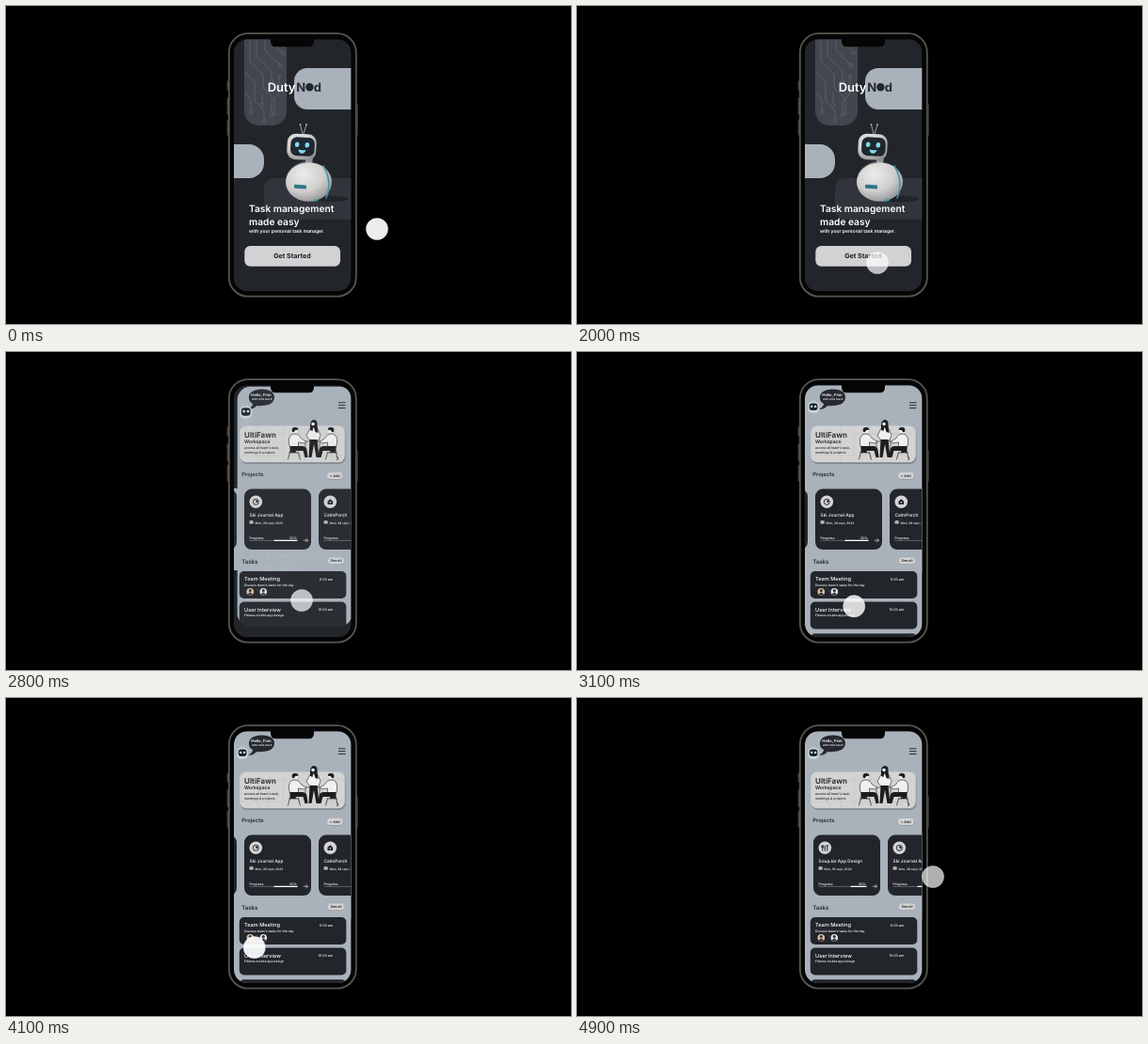
An HTML page that plays this animation: 600 by 338 pixels, repeating every 5 s.

```html
<!DOCTYPE html>
<html lang="en">
<head>
<meta charset="utf-8">
<title>Task manager app</title>
<style>
html, body { margin: 0; width: 100%; height: 100%; overflow: hidden; background: #000; }
svg { display: block; width: 100vw; height: 100vh; }
text { font-family: Inter, "Open Sans", sans-serif; font-weight: 500; text-rendering: geometricPrecision; }
</style>
</head>
<body>
<svg id="stage" viewBox="0 0 600 338" preserveAspectRatio="none"></svg>
<script>
const DARK = '#22262b', LIGHT = '#a9b2bb', PALE = '#d4d4d5';
const label = (s, x, y, size, fill = '#fff', weight = 500, anchor = 'start') =>
  `<text x="${x}" y="${y}" font-size="${size}" fill="${fill}" style="font-weight:${weight}" text-anchor="${anchor}">${s}</text>`;
const rect = (x, y, w, h, r, fill, more = '') =>
  `<rect x="${x}" y="${y}" width="${w}" height="${h}" rx="${r}" fill="${fill}" ${more}/>`;
const dot = (x, y, r, fill, more = '') => `<circle cx="${x}" cy="${y}" r="${r}" fill="${fill}" ${more}/>`;
const line = (d, stroke, w = 1, more = '') =>
  `<path d="${d}" fill="none" stroke="${stroke}" stroke-width="${w}" stroke-linecap="round" ${more}/>`;

const phone = rect(236.8, 29.2, 135, 279.4, 20, '#050506', 'stroke="#55564f" stroke-width="1.8"')
  + line('M235.3 80v9M235.3 98v17M235.3 121v16M373 105v32', '#484945', 1.3);

const circuit = rect(253, 20, 45, 107, 15, '#42474f')
  + `<g clip-path="url(#panel)">`
  + line('M259 35v24l14 14v14l12 12v13M266 35v18l16 16v9M253 70l11 11v20l10 10v10M275 35v12l15 15M253 92l7 7v12M284 35v5l9 9M290 77v16l-8 8v13M272 93v10', '#626871', .7)
  + [[282, 80], [285, 114], [274, 122], [291, 63], [260, 113], [294, 50], [290, 75], [272, 105], [282, 116]]
    .map(([x, y]) => dot(x, y, 1.7, '#42474f', 'stroke="#626871" stroke-width=".7"')).join('')
  + '</g>';

const robot = `<ellipse cx="343" cy="205" rx="20" ry="3.2" fill="#15181b" opacity=".6"/>
  ${line('M315 136L312.500 126M316 136L319 126', '#b9b9b9', .8)}${dot(312.5, 126, .8, '#ddd')}${dot(319, 126, .8, '#ddd')}
  <path d="M318 160h8l-1 9h-7z" fill="#8d9093"/>
  <ellipse cx="321.5" cy="187" rx="24.5" ry="20.8" fill="url(#shell)"/>
  ${line('M337 170q10 17 3 34', '#4795a3', 1.6)}${line('M299 178q8-12 22-13', '#aaa9aa', .6)}
  ${rect(306, 190, 13, 4, 1, '#2f7685', 'transform="rotate(4 312 192)"')}
  ${line('M327 207l4-1', '#4795a3', 2.2)}
  <g transform="rotate(3 314 150)">${rect(298.5, 136, 31, 27.5, 9, 'url(#shell)')}${rect(302.2, 139.5, 25.5, 20, 6.5, '#20272e')}
  <ellipse cx="309" cy="147.5" rx="2.3" ry="2.8" fill="#7edbee"/><ellipse cx="319.7" cy="147.5" rx="2.3" ry="2.8" fill="#7edbee"/>
  <path d="M310.5 152.7q4 1.2 8 0q-.8 4-4 4t-4-4z" fill="#7edbee"/></g>`;

const welcome = label('Duty', 307.5, 90.5, 13, '#fff', 600, 'end') + label('N', 308.3, 90.5, 13, '#24272d', 700)
  + dot(322.4, 86.3, 4.2, '#24272d') + label('d', 326.7, 90.5, 13, '#24272d', 700)
  + label('Task management', 258, 218.6, 10.2, '#fff', 600) + label('made easy', 258, 232.6, 10.2, '#fff', 600)
  + label('with your personal task manager.', 258, 241.3, 5, '#fff', 600)
  + rect(253.3, 255, 101.7, 21.8, 6, '#d3d1d4') + label('Get Started', 304, 268.4, 7.1, '#1c1e22', 700, 'middle');

// Two seated colleagues and one standing between them
const seated = `<path d="M-7 15q-1-9 5-10q6 0 8 5l5 3l-1 2l-7-1v5h-9z" fill="#f0f0f0" stroke="#222" stroke-width=".6"/>
  <path d="M-6 18h13q4 0 5 4l1 8h-3l-2-7h-8l1 2h-7z" fill="#1d1d1f"/>${line('M-6 25l-2 7M3 25l2 7M-7 25h10', '#333', .8)}
  ${dot(-.5, 1.5, 2.5, '#eee')}<path d="M-3.500 3q-1.500-5 3-5q4 0 3 3q-3-1-4 2z" fill="#1d1d1f"/>`;
const people = line('M314 95h23M318 95v17M333 95v17', '#444', .7)
  + `<g transform="translate(307.500 82)">${seated}</g><g transform="translate(344.500 82) scale(-1 1)">${seated}</g>`
  + `<path d="M323 81l7-1l4 8l-2 6h-9l-4-5z" fill="#f0f0f0" stroke="#222" stroke-width=".6"/>
  <path d="M322.500 93h8l2 19h-3l-2.500-14l-2.500 14h-3z" fill="#1d1d1f"/>
  <path d="M323 83q-1-11 4-11q4 0 3.500 6l1 8l-3-1l-2-6l-1 5z" fill="#1d1d1f"/>` + dot(326, 76.5, 1.8, '#eee');

const icons = {
  food: line('M-2.5-2v5M0-2v5M2.5-2v5M-3.3-2.5v2h1.6v-2M1.7-2.5h1.5', '#22262b', 1),
  art: dot(0, 0, 3, 'none', 'stroke="#22262b" stroke-width="1"') + dot(1, -.5, 1.2, '#22262b'),
  home: '<path d="M0-3l2.8 2.4v3.200h-5.600v-3.200z" fill="#22262b"/>' + dot(0, .6, .8, PALE)
};
const project = (i, icon, name, date, pct) => `<g transform="translate(${i * 79} 0)">${rect(0, 145.6, 71, 64.4, 8, DARK)}
  ${dot(12.3, 159.3, 6.8, PALE)}<g transform="translate(12.3 159.3)">${icon}</g>
  ${label(name, 5.6, 175.2, 4.75)}${rect(5.6, 179.2, 4, 3.2, .4, PALE)}${line('M5.8 179.5l1.8 1.5l1.8-1.5', DARK, .4)}
  ${label(date, 11.5, 182.8, 3.2)}${label('Progress', 5.6, 198.7, 3.5)}${label(pct + '%', 56, 198.7, 3.5, '#fff', 500, 'end')}
  ${line('M6 200.4h50', '#777c82', .7)}${line(`M${pct > 60 ? 40 : 32} 200.4H56`, '#fff', 1.1)}
  ${line('M63.2 200.2h4.3m-1.8-1.8l1.8 1.8l-1.8 1.8', '#ddd', .7)}</g>`;
const projects = project(0, icons.food, 'SoupJar App Design', 'Mon, 19 sept, 2022', 85)
  + project(1, icons.art, 'Ski Journal App', 'Mon, 28 sept, 2022', 50)
  + project(2, icons.home, 'CalmPorch', 'Wed, 28 sept, 2022', 70);

const task = (y, name, note, time) => rect(247.8, y, 113.5, 29, 5, DARK) + label(name, 253, y + 10.2, 5.6)
  + label(note, 253, y + 15.6, 3.4) + label(time, 347, y + 9.9, 3.6, '#fff', 500, 'end');
const face = (x, back, hair) => dot(x, 254.7, 3.8, back) + dot(x, 253.6, 1.6, hair)
  + `<path d="M${x - 2.5} 257.4q2.5-4 5 0q-2.5 1.8-5 0z" fill="${hair}"/>`;
const pill = (x, y, w, s) => rect(x, y + .6, w, 7, 3.3, '#7f868d') + rect(x, y, w, 7, 3.3, PALE)
  + label(s, x + w / 2, y + 4.9, 3.8, '#222', 600, 'middle');

const home = `<path d="M257 61q5-3 5-6q-5-3-4-8q1-7 13-7.5q13 0 14 8q0 9-13 9.5q-4 .5-6 0q-3 4-9 4z" fill="#26292f"/>`
  + label('Hello, Finn', 260.3, 47.4, 4.2, '#fff', 600) + label('welcome back', 261, 51.2, 3.1)
  + line('M353.3 53.8h6.8M353.3 56.7h6.8M353.3 59.6h6.8', '#25282d', 1)
  + rect(249, 80, 111.5, 39, 7, '#7f878f') + rect(248.3, 78.5, 111.5, 38.7, 7, '#d3d3d3')
  + line('M280 79v38M294 79v38M268 79v38M311 79v38M345 79v38M250 87h109M250 110h109', '#bdbdbe', .4) + people
  + label('UltiFawn', 253, 91.2, 8, '#222', 600) + label('Workspace', 253, 97.2, 5, '#222', 600)
  + label("access all team's task,", 253, 102.7, 3.45, '#222') + label('meetings &amp; projects', 253, 107.7, 3.45, '#222')
  + line('M351.3 111.5l1.6 1.7l-1.6 1.7', '#222', .8)
  + label('Projects', 250.2, 132.3, 5.9, '#24272c', 600) + pill(341, 128, 16.5, '+ Add')
  + `<g id="cards">${projects}</g>`
  + label('Tasks', 250.2, 225, 6.1, '#24272c', 600) + pill(342, 218.5, 17, 'See all')
  + task(233, 'Team Meeting', "Discuss team's tasks for the day", '9:00 am')
  + face(259.3, '#d9c5ad', '#4a3428') + face(273.3, '#e4e4e4', '#3a3a3d') + line('M266 252l1.5 1.5', '#777', .5)
  + task(265.5, 'User Interview', 'Fitness mobile app design', '10:00 am') + rect(247.8, 299.3, 113.5, 29, 5, DARK);

const avatar = line('M-1-5l-.7-2.200M1-5l.7-2.200', '#d5dde2', .5) + rect(-5.7, -5.5, 11.6, 11.8, 4.5, '#ccd7dd')
  + rect(-4.3, -4, 8.8, 7.6, 3, '#1d242b') + dot(-1.8, -.6, 1.2, '#d5f3f8') + dot(2.1, -.6, 1.2, '#d5f3f8');

document.getElementById('stage').innerHTML = `<defs>
  <clipPath id="screen"><rect x="242" y="35.5" width="124.3" height="267.5" rx="14"/></clipPath>
  <clipPath id="panel"><rect x="253" y="20" width="45" height="107" rx="15"/></clipPath>
  <radialGradient id="shell" cx=".38" cy=".3" r=".75"><stop offset="0" stop-color="#ececeb"/><stop offset=".6" stop-color="#cfcecd"/><stop offset="1" stop-color="#929295"/></radialGradient>
  </defs>${phone}<g clip-path="url(#screen)">${rect(242, 35, 125, 268, 0, DARK)}
  <g class="old">${circuit}${rect(274, 183, 110, 44, 11, '#31353b')}</g>
  <rect id="right" fill="${LIGHT}"/><rect id="left" fill="${LIGHT}"/>
  <g class="old">${welcome}</g><g id="home">${home}</g>
  <g id="robot">${robot}</g><g id="avatar">${avatar}</g></g>
  <path d="M279.500 34h49q-1 0-1.500 2v2q-.5 5.300-5 5.300h-36q-4.500 0-5-5.300v-2q-.5-2-1.500-2z" fill="#050506"/>
  <circle id="cursor" r="11.6" stroke="#fff" stroke-opacity=".4" stroke-width=".8"/>`;

const $ = id => document.getElementById(id);
const set = (el, attrs) => { for (const k in attrs) el.setAttribute(k, attrs[k]); };
const mix = (a, b, p) => a + (b - a) * p;

// Smooth curve through [time, value...] keys, flat at turning points
function track(keys, t, k = 1) {
  const slope = i => {
    const a = keys[i - 1], b = keys[i], c = keys[i + 1];
    if (!a || !c || (b[k] - a[k]) * (c[k] - b[k]) <= 0) return 0;
    return (c[k] - a[k]) / (c[0] - a[0]);
  };
  const i = keys.findIndex(key => key[0] > t) - 1;
  const a = keys[i], b = keys[i + 1], d = b[0] - a[0], u = (t - a[0]) / d, v = 1 - u;
  return a[k] * v * v * (1 + 2 * u) + b[k] * u * u * (3 - 2 * u) + d * u * v * (slope(i) * v - slope(i + 1) * u);
}

const path = [[0, 394, 237], [1250, 394, 237], [1500, 366, 254], [1800, 322, 276], [2000, 319, 273], [2400, 315, 267],
  [2800, 314, 264], [3000, 306, 265], [3250, 274, 280], [3500, 250, 293], [3650, 249, 295], [3850, 249, 295],
  [4050, 259, 274], [4200, 281, 244], [4300, 325, 225], [4400, 385, 206], [4500, 427, 197], [4630, 432, 194],
  [4800, 411, 191], [4900, 378, 190], [5000, 345, 190]];
const press = [[0, .93], [1800, .93], [2000, .7], [3000, .7], [3200, .93], [4200, .93], [4300, .69], [5000, .69]];
const swipe = [[0, 174], [4200, 174], [4300, 195], [4400, 241], [4500, 271], [4570, 273], [4700, 266], [4800, 257], [4900, 251], [5000, 250]];

function draw(now) {
  const t = Math.floor(now % 5000 / 100) * 100; // ten pictures a second
  const u = Math.min(1, Math.max(0, (t - 2450) / 570)), p = 1 - (1 - u) ** 3;
  const box = (id, a, b) => {
    const [x, y, w, h, r] = a.map((v, i) => mix(v, b[i], p));
    set($(id), { x, y, width: w, height: h, rx: r });
  };
  box('right', [306, 66, 76, 44, 14], [242, 35, 125, 268, 14]);
  box('left', [222, 147, 52, 36, 16], [222, 145, 145, 90, 0]);
  document.querySelectorAll('.old').forEach(g => set(g, { opacity: 1 - p }));
  set($('home'), { opacity: p });
  const x = mix(314, 251, p), y = mix(150, 58.5, p), s = mix(1, .36, p);
  set($('robot'), { opacity: 1 - p, transform: `translate(${x} ${y}) scale(${s}) translate(-314 -150)` });
  set($('avatar'), { opacity: p, transform: `translate(${x} ${y}) scale(${s / .36})` });
  set($('cards'), { transform: `translate(${track(swipe, t)} 0)` });
  set($('cursor'), { cx: track(path, t), cy: track(path, t, 2), fill: `rgba(255,255,255,${track(press, t)})` });
}
const start = performance.now();
function loop() {
  draw(performance.now() - start);
  requestAnimationFrame(loop);
}
loop();
</script>
</body>
</html>
```
